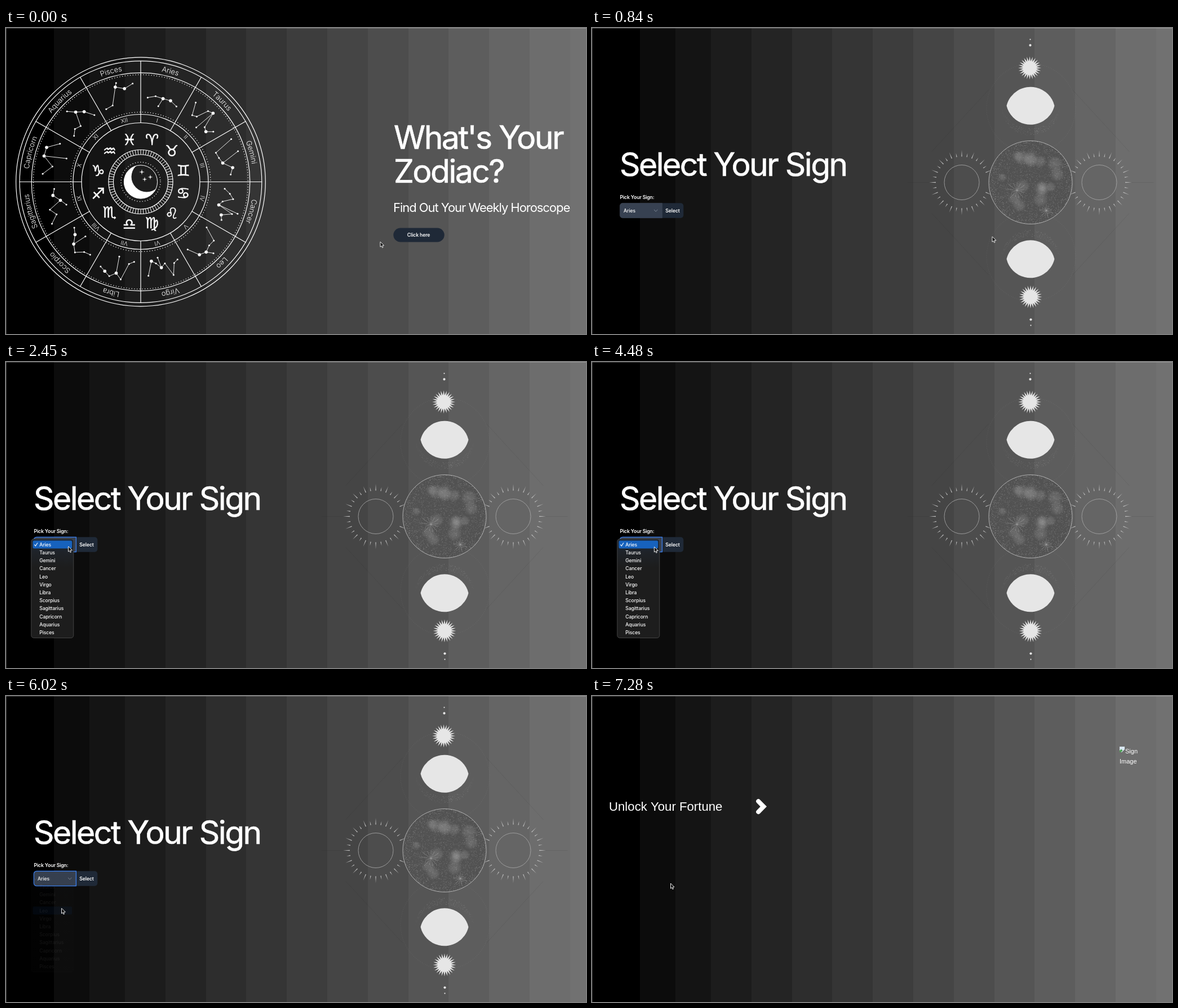
Write an HTML page with a canvas that moves like this. It is 1029 px wide and 544 px high and loops after 8 s.

```html
<!DOCTYPE html>
<html lang="en">
<head>
<meta charset="utf-8">
<title>Zodiac</title>
<style>
html, body { margin: 0; width: 100%; height: 100%; overflow: hidden; background: #000; }
canvas { display: block; }
</style>
</head>
<body>
<canvas id="stage" width="1029" height="544"></canvas>
<script>
const W = 1029, H = 544, LOOP = 8000, STEP = 70, TAU = Math.PI * 2;
const stage = document.getElementById('stage').getContext('2d');
const SANS = 'Inter, sans-serif', PLAIN = '"Liberation Sans", sans-serif';
const SLATE = '#1f2937', SLATE_HOVER = '#374151', FOCUS = '#3b82f6', PALE = '#e6e6e6';
let g = stage;

function text(str, x, y, size, weight = 400, spacing = 0, family = SANS) {
  g.font = `${weight} ${size}px ${family}`;
  g.letterSpacing = spacing + 'px';
  g.textAlign = 'left';
  g.textBaseline = 'alphabetic';
  g.fillStyle = '#fff';
  g.fillText(str, x, y);
  g.letterSpacing = '0px';
}

// Large headings get a hairline outline for a slightly fuller stroke.
function heading(str, x, y) {
  text(str, x, y, 57, 400, -2.5);
  g.letterSpacing = '-2.5px';
  g.strokeStyle = '#fff';
  g.lineWidth = 0.7;
  g.strokeText(str, x, y);
  g.letterSpacing = '0px';
}

function disc(x, y, r, color = '#fff') {
  g.fillStyle = color;
  g.beginPath();
  g.arc(x, y, r, 0, TAU);
  g.fill();
}

function ring(x, y, r, width = 1.2, color = '#fff', dash = []) {
  g.strokeStyle = color;
  g.lineWidth = width;
  g.lineCap = dash.length ? 'round' : 'butt';
  g.setLineDash(dash);
  g.beginPath();
  g.arc(x, y, r, 0, TAU);
  g.stroke();
  g.setLineDash([]);
}

function trace(points) {
  g.beginPath();
  points.forEach(p => g.lineTo(p[0], p[1]));
}

function line(points, width = 1, color = '#fff') {
  g.strokeStyle = color;
  g.lineWidth = width;
  trace(points);
  g.stroke();
}

function shape(points, color) {
  g.fillStyle = color;
  trace(points);
  g.fill();
}

function star(x, y, spikes, outer, inner, color = '#fff') {
  shape(Array.from({ length: spikes * 2 }, (_, i) => polar(i * Math.PI / spikes, i % 2 ? inner : outer, x, y)), color);
}

function box(x, y, w, h, radii, fill, stroke, width = 1) {
  g.beginPath();
  g.roundRect(x, y, w, h, radii);
  g.fillStyle = fill;
  g.fill();
  if (stroke) { g.strokeStyle = stroke; g.lineWidth = width; g.stroke(); }
}

// Angles run clockwise from the top.
function polar(angle, r, x, y) {
  return [x + r * Math.sin(angle), y - r * Math.cos(angle)];
}

function seeded(seed) {
  return () => (seed = (seed * 16807) % 2147483647) / 2147483647;
}

function drawBackdrop() {
  g.fillStyle = '#000';
  g.fillRect(0, 0, W, H);
  for (let i = 1; i < 15; i++) {
    const x = Math.round(71.8 * i - 4.5 + 9 * Math.max(0, 3 - i));
    const tone = Math.min(113, 4 + 8.1 * i);
    g.fillStyle = `rgb(${tone},${tone},${tone})`;
    g.fillRect(x, 0, W - x, H);
  }
  g.fillStyle = 'rgba(255,255,255,.25)';
  g.fillRect(0, 0, W, 1);
  g.fillRect(0, 0, 1, H);
}

// Renders a static page once into its own canvas.
function page(draw) {
  const sheet = document.createElement('canvas');
  sheet.width = W;
  sheet.height = H;
  g = sheet.getContext('2d');
  drawBackdrop();
  draw();
  g = stage;
  return sheet;
}

/* ---------- Zodiac wheel ---------- */
const CX = 239, CY = 273.5;
const SIGNS = ['Aries', 'Taurus', 'Gemini', 'Cancer', 'Leo', 'Virgo', 'Libra',
  'Scorpio', 'Sagittarius', 'Capricorn', 'Aquarius', 'Pisces'];
const ROMAN = 'I II III IV V VI VII VIII IX X XI XII'.split(' ');

const onWheel = (angle, r) => polar(angle, r, CX, CY);

function spoke(angle, from, to, width) {
  line([onWheel(angle, from), onWheel(angle, to)], width);
}

function arcText(str, angle, r, size) {
  g.font = `300 ${size}px ${SANS}`;
  g.textAlign = 'center';
  g.textBaseline = 'middle';
  g.fillStyle = '#fff';
  let along = -g.measureText(str).width / 2;
  for (const ch of str) {
    const w = g.measureText(ch).width;
    g.save();
    g.translate(CX, CY);
    g.rotate(angle + (along + w / 2) / r);
    g.fillText(ch, 0, -r);
    g.restore();
    along += w;
  }
}

function glyph(index, angle) {
  const [x, y] = onWheel(angle, 78);
  const sign = String.fromCodePoint(0x2648 + index) + '\uFE0E';
  g.font = '27px "DejaVu Sans", sans-serif';
  g.textAlign = 'center';
  g.textBaseline = 'alphabetic';
  const m = g.measureText(sign);
  const base = y + (m.actualBoundingBoxAscent - m.actualBoundingBoxDescent) / 2;
  g.fillStyle = g.strokeStyle = '#fff';
  g.lineWidth = 0.5;
  g.fillText(sign, x, base);
  g.strokeText(sign, x, base);
}

// A chain of stars wanders across the sector, with one side branch.
function constellation(mid, rand) {
  const count = 5 + Math.floor(rand() * 4);
  const stars = Array.from({ length: count }, (_, i) =>
    onWheel(mid + (i / (count - 1) - 0.5) * 0.36, 142 + 36 * rand()));
  const hub = Math.floor(count / 2);
  const tip = onWheel(mid + 0.12 * (rand() - 0.5), rand() < 0.5 ? 138 : 181);
  line(stars, 0.9);
  line([stars[hub], tip], 0.9);
  [...stars, tip].forEach((p, i) => disc(p[0], p[1], i === hub || i === count - 2 ? 2.8 : 1.5));
}

function drawWheel() {
  const rand = seeded(2024);
  [221.3, 214.8, 193.8, 120, 105, 57, 48.5].forEach(r => ring(CX, CY, r));
  [190.5, 124, 35].forEach(r => ring(CX, CY, r, 1.5, '#fff', [0, 4.7]));
  for (let i = 0; i < 72; i++) spoke(i * TAU / 72, 49, 57, 1);

  SIGNS.forEach((name, i) => {
    const mid = (i + 0.5) * TAU / 12;
    spoke(i * TAU / 12, 105, 214.8, 1.2);
    arcText(name, mid, 203.5, 13);
    arcText(ROMAN[i], mid, 112.5, 10.5);
    glyph(i, mid);
    constellation(mid, rand);
  });

  g.save();
  g.beginPath();
  g.arc(CX, CY, 30, 0, TAU);
  g.clip();
  disc(CX, CY, 30);
  disc(249.5, 264.5, 27, '#1e1e1e');
  g.restore();
  ring(CX, CY, 29.6, 1);
  star(241, 256, 4, 5, 1.2);
  star(256, 265, 4, 4.5, 1.1);
  star(246, 269, 4, 4.5, 1.1);
}

const home = page(() => {
  drawWheel();
  heading("What's Your", 688, 215);
  heading('Zodiac?', 688, 275);
  text('Find Out Your Weekly Horoscope', 687, 327, 22, 400, -1.05);
});

/* ---------- Celestial column ---------- */
function lens(x, y) {
  const r = 43.7, drop = 10.2, tilt = Math.asin(drop / r);
  g.fillStyle = PALE;
  g.beginPath();
  g.arc(x, y + drop, r, Math.PI + tilt, TAU - tilt);
  g.arc(x, y - drop, r, tilt, Math.PI - tilt);
  g.fill();
}

// Rays leave a gap on the side that faces the moon.
function raySun(x, y, facing) {
  ring(x, y, 31, 0.9, '#a2a2a2');
  for (let i = 0; i < 32; i++) {
    const a = i * TAU / 32;
    if (Math.sin(a) * facing > 0.94) continue;
    shape([polar(a - 0.016, 46, x, y), polar(a, i % 2 ? 53 : 58, x, y), polar(a + 0.016, 46, x, y)], '#bcbcbc');
  }
}

function burst(x, y, size, rand) {
  for (let i = 0; i < 13; i++) {
    const reach = size * (0.5 + rand() * 0.5);
    for (let d = 3; d < reach; d += 1.8) disc(...polar(i * TAU / 13, d, x, y), 0.5, 'rgba(225,225,225,.55)');
  }
  disc(x, y, 2, 'rgba(225,225,225,.45)');
}

function haze(x, y, r) {
  const glow = g.createRadialGradient(x, y, 0, x, y, r);
  glow.addColorStop(0, 'rgba(170,170,170,.3)');
  glow.addColorStop(0.6, 'rgba(170,170,170,.18)');
  glow.addColorStop(1, 'rgba(170,170,170,0)');
  disc(x, y, r, glow);
}

function stippledMoon(x, y, r) {
  const rand = seeded(71);
  const inDisc = reach => polar(rand() * TAU, reach * Math.sqrt(rand()), x, y);
  disc(x, y, r, '#525252');
  for (let i = 0; i < 16; i++) {
    const [px, py] = inDisc(r * 0.75);
    haze(px, py - 6, 7 + rand() * 9);
  }
  for (let i = 0; i < 3200; i++) {
    const [px, py] = inDisc(r);
    const rim = (Math.hypot(px - x, py - y) / r) ** 4;
    g.fillStyle = `rgba(225,225,225,${(0.1 + rand() * 0.35) * (0.7 + 0.5 * rim)})`;
    g.fillRect(px, py, 0.8, 0.8);
  }
  burst(x - 24, y + 14, 20, rand);
  burst(x + 28, y + 50, 14, rand);
  ring(x, y, r, 1, '#b0b0b0');
}

function dustCrescent(x, y, dir, rand) {
  for (let i = 0; i < 400; i++) {
    const a = rand() * Math.PI, r = 52 - 13 * rand() * Math.sin(a);
    g.fillStyle = `rgba(205,205,205,${rand() * 0.35 * Math.sin(a)})`;
    g.fillRect(x + r * Math.cos(a), y + dir * r * Math.sin(a), 0.8, 0.8);
  }
}

function drawColumn() {
  const x = 778, y = 274.5, faint = 'rgba(20,20,20,.1)', rand = seeded(9);
  for (const side of [-1, 1]) {
    ring(x + 1, y + side * 132, 79, 0.8, 'rgba(205,205,205,.18)', [0, 3.2]);
    line([[x + side * 175, y], [x + side * 218, y]], 1, faint);
    for (const end of [-1, 1]) line([[x + side * 75, y + end * 164], [x + side * 175, y + end * 55]], 0.8, faint);
    dustCrescent(x, y + side * 135.5, -side, rand);
    lens(x, y + side * 136.2);
    star(x - 0.7 + side * 0.7, y + side * 203.5, 24, 20.5, 11.8, PALE);
    raySun(x + side * 122, y, -side);
    disc(x + side * 0.5, y + side * 243.8, 2.1, PALE);
    disc(x + side * 0.5, y + side * 254.2, 1.1, PALE);
  }
  stippledMoon(x, y, 74);
}

const picker = page(() => {
  drawColumn();
  heading('Select Your Sign', 49, 262.5);
  text('Pick Your Sign:', 49.5, 303.5, 8.8, 600, -0.2);
});

const fortune = page(() => {
  text('Unlock Your Fortune', 30, 203.5, 22.2, 400, 0, PLAIN);
  g.lineCap = 'round';
  line([[295.2, 187.2], [304.4, 196.6], [295.2, 206]], 8);
  box(936, 90, 9, 10, 0, '#d9e6f2');
  shape([[936, 100], [936, 97], [939, 94.5], [941.5, 97], [938.5, 100]], '#4f9d55');
  shape([[945, 95], [940, 100], [945, 100]], '#6d6d6d');
  text('Sign', 946, 102.3, 11, 400, 0, PLAIN);
  text('Image', 936, 119.5, 11, 400, 0, PLAIN);
});

/* ---------- Live parts ---------- */
const MOVES = [
  { from: 0, to: 350, x: 710, y: 371 },
  { from: 1470, to: 1680, x: 277, y: 326 },
  { from: 1820, to: 2310, x: 110.5, y: 328 },
  { from: 4410, to: 5250, x: 106, y: 369 },
  { from: 5250, to: 5530, x: 98.5, y: 377.5 },
  { from: 6230, to: 6720, x: 139.5, y: 333 }
];
const PRESSES = [560, 5530, 7000];
const MENU = SIGNS.map(s => s === 'Scorpio' ? 'Scorpius' : s);
const ROW = 14.2, MENU_TOP = 317.4;

const ramp = (t, a, b) => Math.min(1, Math.max(0, (t - a) / (b - a)));
const ease = p => p * p * (3 - 2 * p);

function cursorAt(t) {
  return MOVES.reduce(([x, y], move) => {
    const p = ease(ramp(t, move.from, move.to));
    return [x + (move.x - x) * p, y + (move.y - y) * p];
  }, [664, 380]);
}

function drawCursor(x, y) {
  g.save();
  g.translate(x, y);
  shape([[0, 0], [0, 9.2], [2.1, 7.4], [3.5, 10.6], [5, 9.9], [3.7, 6.8], [6.5, 6.6]], '#111');
  g.closePath();
  g.strokeStyle = '#fff';
  g.lineWidth = 0.9;
  g.stroke();
  g.restore();
}

function drawHomeButton(t) {
  if (t >= PRESSES[0]) box(685, 353, 95, 30, 15, SLATE_HOVER);
  box(687.3, 355.6, 90.4, 24.8, 12.4, t >= 210 ? SLATE_HOVER : SLATE);
  text('Click here', 711.8, 371, 8.6, 600, -0.1);
}

function drawSelect(t) {
  const pressed = t >= PRESSES[2], focused = t >= 2380 && !pressed;
  if (pressed) box(122, 309, 43, 31.5, 6, SLATE_HOVER);
  box(124, 311.3, 38.3, 26.4, [0, 5, 5, 0], t >= 6580 ? SLATE_HOVER : SLATE);
  box(49.4, 311.3, 75, 26.4, [5, 0, 0, 5], SLATE_HOVER, focused ? FOCUS : '#4b5563', focused ? 1.2 : 0.4);
  text(t >= 6090 ? 'Leo' : 'Aries', 56, 327.7, 8.6, 500, -0.05);
  text('Select', 130.3, 327.7, 8.6, 600, -0.1);
  g.lineCap = 'round';
  line([[110.2, 323.2], [113.2, 326.2], [116.2, 323.2]], 1, '#7d8694');
}

function drawMenu(t, cursorY) {
  if (t < 2380 || t >= 6090) return;
  g.save();
  g.globalAlpha = 1 - ramp(t, 5810, 6035);
  const shade = g.createLinearGradient(0, 314, 0, 365);
  shade.addColorStop(0, '#202833');
  shade.addColorStop(1, '#1d1d1d');
  box(44.8, 314.5, 75, 176, 4.5, shade, '#505050', 0.8);
  const row = Math.floor((cursorY - MENU_TOP) / ROW);
  const blink = t >= 5670 && t < 5740;
  if (!blink) box(47.5, MENU_TOP + row * ROW, 69.7, ROW, 2.5, '#1762bd');
  MENU.forEach((name, i) => text(name, 59.2, 327.7 + i * ROW, 8.6, 500, -0.08));
  line([[50.6, 324.8], [52.4, 327], [55.8, 321.8]], 1.1);
  g.restore();
}

function render(now) {
  const t = Math.floor((now % LOOP) / STEP) * STEP;
  const [x, y] = cursorAt(t);
  if (t < 840) {
    g.drawImage(home, 0, 0);
    drawHomeButton(t);
  } else if (t < 7210) {
    g.drawImage(picker, 0, 0);
    drawSelect(t);
    drawMenu(t, y);
  } else {
    g.drawImage(fortune, 0, 0);
  }
  if (PRESSES.some(p => t >= p && t < p + 210)) ring(x, y, 13, 1.3, 'rgba(200,200,200,.65)');
  drawCursor(x, y);
}

let start;
function tick(now) {
  start ??= now;
  render(now - start);
  requestAnimationFrame(tick);
}
render(0);
requestAnimationFrame(tick);
</script>
</body>
</html>
```
